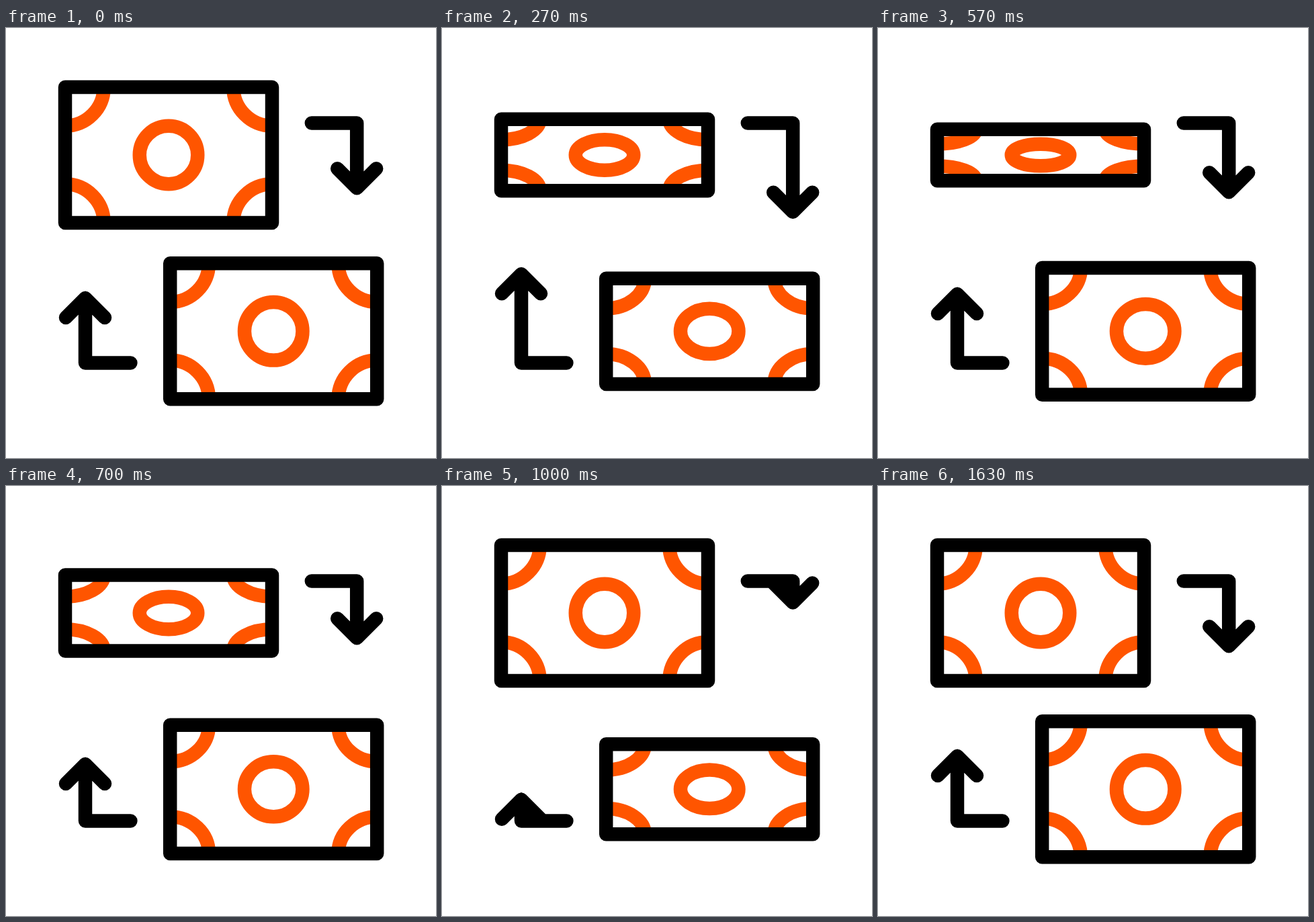
Animation of 640 by 640 pixels, one loop 2000 ms. Source, as an HTML page with a canvas:

```html
<!DOCTYPE html>
<html lang="en">
<head>
<meta charset="utf-8">
<title>Money exchange</title>
<style>
  html, body { margin: 0; width: 100%; height: 100%; overflow: hidden; background: #fff; }
  canvas { display: block; width: 100vmin; height: 100vmin; }
</style>
</head>
<body>
<canvas id="stage" width="640" height="640"></canvas>
<script>
const ctx = document.getElementById("stage").getContext("2d");
const INK = "#000", ACCENT = "#ff5500";
const LOOP = 2000, FPS = 30, LAST = 49;

// Keys are [frame, value]; every stretch eases in and out on a sine.
const topFlip = [[0, 1], [12, -1.035], [25, 1]];
const bottomFlip = [[5, 1], [19, -1.035], [34, 1]];
const arrowShift = [[0, 0], [12.2, 48.5], [19.8, -12], [23.3, -12], [31, -67], [38.7, -12], [LAST, 0]];

function valueAt(keys, frame) {
  if (frame <= keys[0][0]) return keys[0][1];
  for (let i = 1; i < keys.length; i++) {
    const [a, from] = keys[i - 1], [b, to] = keys[i];
    if (frame <= b) {
      const u = (frame - a) / (b - a);
      return from + (to - from) * (1 - Math.cos(Math.PI * u)) / 2;
    }
  }
  return keys[keys.length - 1][1];
}

function ellipseArc(x, y, rx, ry, start, end) {
  ctx.beginPath();
  ctx.ellipse(x, y, rx, ry, 0, start, end);
  ctx.stroke();
}

function drawNote(cx, cy, flip) {
  const scale = Math.abs(flip), w = 154, h = 101 * scale;
  ctx.save();
  ctx.beginPath();
  ctx.rect(cx - w, cy - h, 2 * w, 2 * h);
  ctx.clip();
  ctx.strokeStyle = ACCENT;
  ctx.lineCap = "butt";
  ellipseArc(cx, cy, 43.25, 43.25 * scale, 0, 2 * Math.PI);
  // Quarter arcs around the corners, clockwise from the top left.
  [[-1, -1], [1, -1], [1, 1], [-1, 1]].forEach(([sx, sy], i) => {
    const start = i * Math.PI / 2;
    ellipseArc(cx + sx * w, cy + sy * h, 57.7, 57.7 * scale, start, start + Math.PI / 2);
  });
  ctx.restore();
  ctx.strokeStyle = INK;
  ctx.strokeRect(cx - w, cy - h, 2 * w, 2 * h);
}

function drawArrow(shift) {
  const x = 522.2, tip = 238.2 + shift, head = 29;
  ctx.strokeStyle = INK;
  ctx.beginPath();
  ctx.moveTo(454.8, 141.6);
  ctx.lineTo(x, 141.6);
  ctx.lineTo(x, tip);
  ctx.moveTo(x - head, tip - head);
  ctx.lineTo(x, tip);
  ctx.lineTo(x + head, tip - head);
  ctx.stroke();
}

function draw(frame) {
  ctx.fillStyle = "#fff";
  ctx.fillRect(0, 0, 640, 640);
  ctx.lineWidth = 20.5;
  ctx.lineCap = ctx.lineJoin = "round";

  drawNote(242, 189, valueAt(topFlip, frame));
  drawNote(398.2, 451.3, valueAt(bottomFlip, frame));

  const shift = valueAt(arrowShift, frame);
  drawArrow(shift);
  ctx.save();
  ctx.translate(640.2, 640.2);
  ctx.rotate(Math.PI);
  drawArrow(shift);
  ctx.restore();
}

// Frames start on whole hundredths of a second.
const startOf = n => Math.round(n * 100 / FPS) * 10;

function frameAt(ms) {
  let n = Math.floor(ms * FPS / 1000) + 1;
  while (startOf(n) > ms) n--;
  return Math.min(n, LAST);
}

const origin = performance.now();
function tick() {
  draw(frameAt((performance.now() - origin) % LOOP));
  requestAnimationFrame(tick);
}
tick();
</script>
</body>
</html>
```
